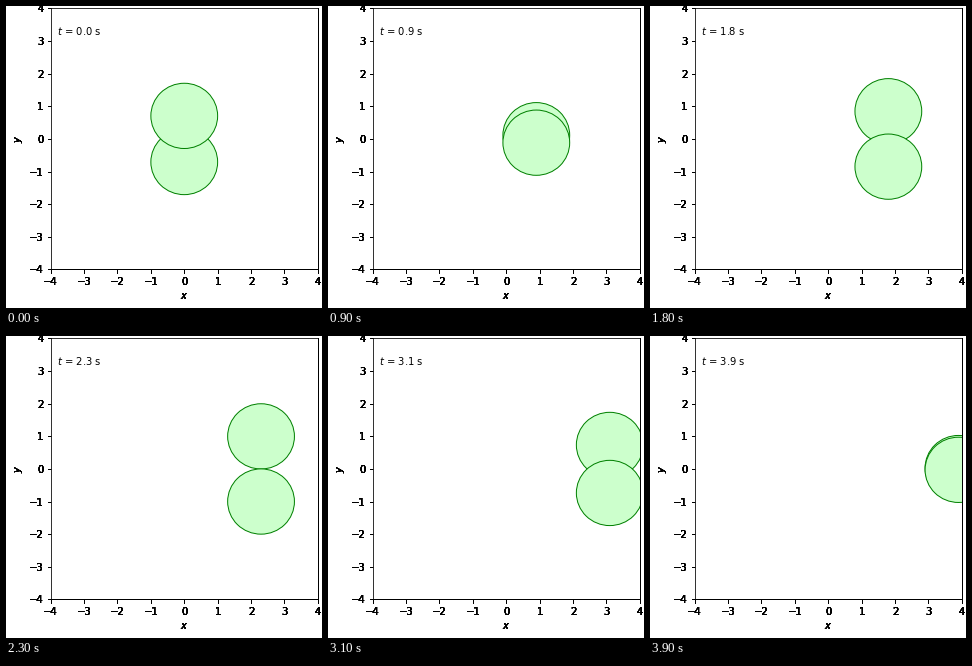
A matplotlib script that plays this animation: 316x302 px, repeating every 4000 ms.

```python
import numpy as np
import matplotlib.pyplot as plt
from matplotlib.animation import FuncAnimation
from matplotlib.patches import Circle

WIDTH, HEIGHT, DPI = 316, 302, 72
LEFT, RIGHT, TOP, BOTTOM = 44.7, 311.8, 2.45, 263.45
FRAMES, INTERVAL = 40, 100
LAYERS = 8

plt.rcParams.update({"font.family": "DejaVu Sans", "font.size": 10,
                     "xtick.major.pad": 4.5})

fig = plt.figure(figsize=(WIDTH / DPI, HEIGHT / DPI), dpi=DPI, facecolor="white")
box = [LEFT / WIDTH, 1 - BOTTOM / HEIGHT,
       (RIGHT - LEFT) / WIDTH, (BOTTOM - TOP) / HEIGHT]


def add_axes(layer):
    ax = fig.add_axes(box, label=f"layer{layer}")
    ax.set(xlim=(-4, 4), ylim=(-4, 4), xlabel="$x$", ylabel="$y$",
           xticks=range(-4, 5), yticks=range(-4, 5))
    return ax


# Stacked axes give the labels their heavy, overprinted edges.
ax = [add_axes(i) for i in range(LAYERS)][-1]


def add_disc():
    return ax.add_patch(Circle((0, 0), 1, facecolor="#ccffcc",
                               edgecolor="green", linewidth=1))


back, front = add_disc(), add_disc()
clock = ax.text(-3.8, 3.2, "")


def update(frame):
    t = frame * INTERVAL / 1000
    y = np.cos(t + np.pi / 4)
    back.center = (t, -y)
    front.center = (t, y)
    clock.set_text(f"$t$ = {t:.1f} s")
    return back, front, clock


anim = FuncAnimation(fig, update, frames=FRAMES, interval=INTERVAL,
                     repeat=True, repeat_delay=0, blit=False)
plt.show()
```
